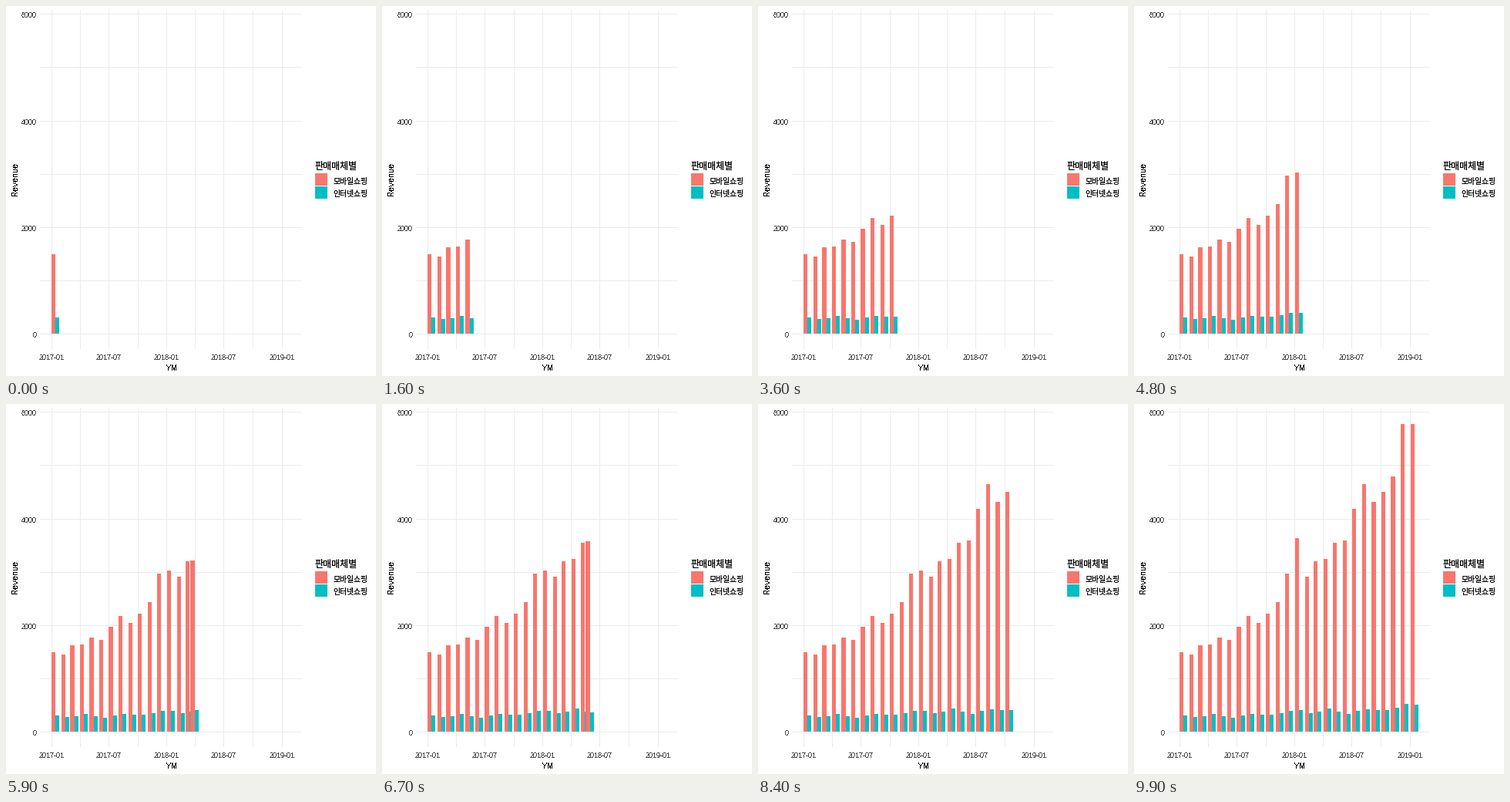
These frames come from a looping animation (480 by 480 pixels, 10000 ms). A matplotlib script:

```python
import itertools

import matplotlib.pyplot as plt
import numpy as np
from matplotlib.animation import FuncAnimation
from matplotlib.patches import Rectangle

plt.rcParams["text.hinting"] = "native"
plt.rcParams["text.hinting_factor"] = 1

RED, CYAN, GRID, TICK = "#F8766D", "#00BFC4", "#EBEBEB", "#4D4D4D"
LATIN, HANGUL = "Liberation Sans", "Noto Sans CJK JP"

MONTH_DAYS = [31, 28, 31, 30, 31, 30, 31, 31, 30, 31, 30, 31]
DAYS = [0, *itertools.accumulate(MONTH_DAYS * 2)]
N = len(DAYS)

X0, PX_PER_DAY = 59.14, 0.4101
BAR_W = 0.45 * 28 * PX_PER_DAY  # two dodged bars share 0.9 of the shortest month
Y0, PX_PER_1000 = 425.45, 69.1
HOLD, STEP = 3, 4  # frames at rest and frames per month

# Yearly growth times a seasonal wave
year = np.arange(N) / 12
w = 2 * np.pi * year
mobile_season = (0.938 + 0.021 * np.cos(w) + 0.04 * np.cos(2 * w)
                 - 0.045 * np.sin(3 * w) - 0.031 * np.sin(5 * w)
                 - 0.016 * np.sin(w / 2) + 0.017 * np.sin(1.5 * w - 0.62))
internet_season = (0.955 + 0.06 * np.cos(w) - 0.085 * np.sin(3 * w)
                   + 0.03 * np.cos(4 * w))
mobile = np.minimum(1500 * 2 ** year * mobile_season, 5780)
internet = 289 * 1.3 ** year * internet_season
series = (mobile, internet)

fig = plt.figure(figsize=(5, 5), dpi=96, facecolor="white")
ax = fig.add_axes([0, 0, 1, 1])
ax.set_xlim(0, 480)
ax.set_ylim(480, 0)
ax.axis("off")


def box(x, y, w, h, color, z=2):
    return ax.add_patch(Rectangle((x, y), w, h, facecolor=color, linewidth=0,
                                  antialiased=False, zorder=z))


def label(x, y, s, px, color="black", ha="center", **kw):
    ax.text(x, y, s, fontsize=px * 0.75, color=color, family=LATIN, ha=ha,
            va="baseline", antialiased=False, **kw)


def hangul(x, y, s, px):
    ax.text(x, y, s, fontsize=px * 0.75, family=HANGUL, weight="light",
            va="baseline")


def place(patch, day, value, slot):
    """Set a dodged bar on whole pixels."""
    left = X0 + day * PX_PER_DAY + slot * BAR_W
    x0, x1 = np.floor([left + 0.5, left + BAR_W + 0.5])
    base = np.floor(Y0)
    top = np.floor(Y0 - value / 1000 * PX_PER_1000)
    patch.set_bounds(x0, top, x1 - x0, base - top)


# Grid and axes: labelled lines with an unlabelled one halfway between
half_years = DAYS[::6]
middles = [(a + b) / 2 for a, b in itertools.pairwise(half_years)]
for day in half_years + middles:
    box(np.floor(59.06 + day * PX_PER_DAY), 5, 1, 440, GRID, 1)
for i, day in enumerate(half_years):
    x = np.floor(59.06 + day * PX_PER_DAY)
    label(x + 0.5, 459, f"{2017 + i // 2}-{1 + i % 2 * 6:02d}", 9, TICK)
for k in range(7):
    y = np.floor(Y0 - k * PX_PER_1000)
    box(44, y, 340, 1, GRID, 1)
    if k % 2 == 0:
        label(39.5, y + 5, str(k * 1000), 9, TICK, ha="right")
label(214.5, 473, "YM", 11)
label(15, 224.5, "Revenue", 11, rotation=90, rotation_mode="anchor")

# Legend
hangul(401, 212, "판매매체별", 12)
for y, color, s in ((217, RED, "모바일쇼핑"), (234, CYAN, "인터넷쇼핑")):
    box(401, y, 16, 16, color)
    hangul(424.5, y + 14, s, 9.8)

# Each month leaves a mark; one pair of bars travels on top
marks = []
for i, day in enumerate(DAYS):
    for slot, color in enumerate((RED, CYAN)):
        patch = box(0, 0, 0, 0, color)
        place(patch, day, series[slot][i], slot)
        marks.append((i, patch))
movers = [box(0, 0, 0, 0, color, z=3) for color in (RED, CYAN)]


def update(frame):
    k, phase = divmod(frame, STEP)
    nxt = (k + 1) % N
    t = max(0, phase - HOLD + 1) / (STEP - HOLD + 1)
    for i, patch in marks:
        patch.set_visible(i <= k)
    day = DAYS[k] + (DAYS[nxt] - DAYS[k]) * t
    for slot, vals in enumerate(series):
        place(movers[slot], day, vals[k] + (vals[nxt] - vals[k]) * t, slot)
    return movers


anim = FuncAnimation(fig, update, frames=N * STEP, interval=100, repeat=True)
plt.show()
```
